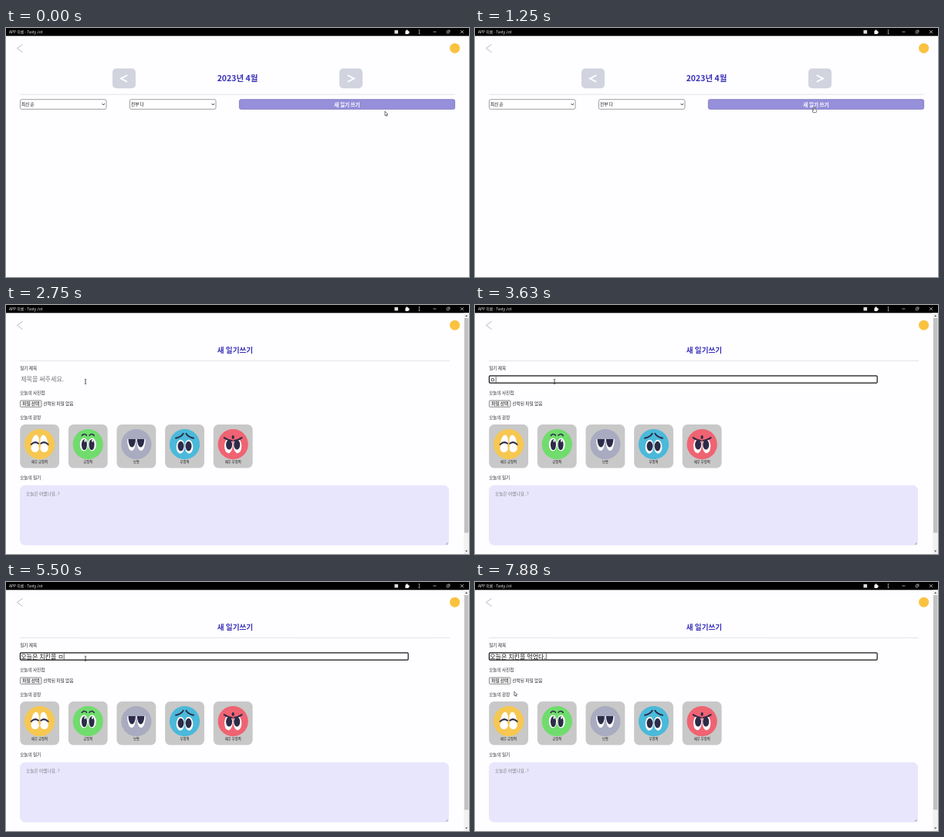
An HTML page with a canvas that plays this animation: 600 by 323 pixels, repeating every 8000 ms.

```html
<!DOCTYPE html>
<html lang="ko">
<head>
<meta charset="utf-8">
<title>Diary</title>
<style>
html, body { margin: 0; width: 100%; height: 100%; overflow: hidden; background: #fefdff; }
canvas { display: block; width: 600px; height: 323px; }
</style>
</head>
<body>
<canvas id="stage"></canvas>
<script>
const LOOP = 8000, TICK = 125;
const FONT = '"Noto Sans CJK KR", "Noto Sans CJK", "Noto Sans", sans-serif';
const INK = '#2c2b48', BLUE = '#3730b8';
const canvas = document.getElementById('stage');
const ctx = canvas.getContext('2d');
const dpr = window.devicePixelRatio || 1;
canvas.width = 600 * dpr;
canvas.height = 323 * dpr;

function rect(x, y, w, h, color) {
  ctx.fillStyle = color;
  ctx.fillRect(x, y, w, h);
}

function box(x, y, w, h, r, fill, stroke, lw = 0.8) {
  ctx.beginPath();
  ctx.roundRect(x, y, w, h, r);
  if (fill) { ctx.fillStyle = fill; ctx.fill(); }
  if (stroke) { ctx.strokeStyle = stroke; ctx.lineWidth = lw; ctx.stroke(); }
}

function text(str, x, y, size, color, align = 'left', weight = 400) {
  ctx.font = `${weight} ${size}px ${FONT}`;
  ctx.textAlign = align;
  ctx.textBaseline = 'middle';
  ctx.fillStyle = color;
  ctx.fillText(str, x, y);
  return ctx.measureText(str).width;
}

function line(points, color, lw) {
  ctx.beginPath();
  points.forEach(([x, y]) => ctx.lineTo(x, y));
  ctx.strokeStyle = color;
  ctx.lineWidth = lw;
  ctx.stroke();
}

function oval(x, y, rx, ry, color, tilt = 0, from = 0, to = Math.PI * 2) {
  ctx.beginPath();
  ctx.ellipse(x, y, rx, ry, tilt, from, to);
  ctx.fillStyle = color;
  ctx.fill();
}

function curve(x0, y0, cx, cy, x1, y1, lw) {
  ctx.beginPath();
  ctx.moveTo(x0, y0);
  ctx.quadraticCurveTo(cx, cy, x1, y1);
  ctx.strokeStyle = INK;
  ctx.lineWidth = lw;
  ctx.lineCap = 'round';
  ctx.stroke();
  ctx.lineCap = 'butt';
}

function triangle(x, y, w, h, color) {
  ctx.beginPath();
  ctx.moveTo(x - w, y - h);
  ctx.lineTo(x + w, y - h);
  ctx.lineTo(x, y + h);
  ctx.fillStyle = color;
  ctx.fill();
}

function drawFrame() {
  rect(0, 0, 600, 323, '#fefdff');
  rect(0, 0, 600, 10.3, '#000');
  text('APP 이름 - Tasty Jot', 4, 5.5, 4.9, '#eee');
  rect(503.5, 2.8, 4.6, 4.6, '#ddd');
  box(517.5, 3.5, 4.3, 4.4, 0.6, '#fff');
  oval(519.6, 3.3, 1, 1, '#fff');
  oval(522, 5.6, 1, 1, '#fff');
  [2.9, 5.1, 7.3].forEach(y => oval(535.5, y, 0.7, 0.7, '#fff'));
  line([[553.5, 5], [557.5, 5]], '#ddd', 0.7);
  box(571.2, 3.9, 2.8, 2.8, 0, null, '#ddd', 0.6);
  line([[572.3, 3], [575, 3], [575, 5.7]], '#ddd', 0.6);
  line([[589, 3], [593, 7]], '#ddd', 0.7);
  line([[593, 3], [589, 7]], '#ddd', 0.7);
  line([[21.7, 21.2], [14.4, 26.4], [21.7, 31.6]], '#aaa9b2', 0.8);
  oval(581.6, 26.2, 6.5, 6.5, '#fac23f');
}

function navButton(x, dir) {
  box(x, 52.5, 30, 25.7, 5, '#d1d3df');
  const c = x + 15, d = 4.2 * dir;
  line([[c - d, 61.3], [c + d, 65.6], [c - d, 69.9]], '#fff', 1.8);
}

function select(x, label) {
  box(x + 0.4, 92.7, 111.6, 12.6, 2, '#fff', '#85858a', 0.8);
  text(label, x + 2, 99, 5.6, '#111');
  line([[x + 106.7, 98.2], [x + 108.3, 99.8], [x + 109.9, 98.2]], '#111', 1);
}

function drawList() {
  navButton(138, -1);
  navButton(432, 1);
  text('2023년 4월', 300, 65.4, 10.5, BLUE, 'center', 700);
  line([[18, 86.2], [582, 86.2]], '#dddce2', 0.8);
  select(18, '최신 순');
  select(160, '전부 다');
  box(302.4, 92.7, 279.2, 12.6, 2, '#968fda', '#7771bd', 0.8);
  text('새 일기 쓰기', 442, 99.2, 6.6, '#fff', 'center', 700);
}

// Each face is drawn around the centre of its disc.
const faces = [
  ['매우 긍정적', '#f6c751', () => {
    for (const s of [-1, 1]) {
      oval(s * 5.6, -2, 4.8, 10.3, '#fff', s * -0.12);
      oval(s * 6, 5, 5.2, 5.2, '#fff');
      curve(s * 1.6, -1, s * 6, -4.6, s * 11, 0.2, 2);
    }
  }],
  ['긍정적', '#70dc6d', () => {
    for (const s of [-1, 1]) {
      oval(s * 5.3, 0.3, 5.2, 8.4, '#fff');
      oval(s * 4.8, 0.6, 3.5, 7, INK);
      oval(s * 4.8 + 1, -4.4, 1, 1.5, '#fff');
      curve(s * 1.8, -11.6, s * 5, -14.8, s * 8, -11.2, 1.5);
    }
  }],
  ['보통', '#a9abc0', () => {
    for (const s of [-1, 1]) {
      oval(s * 6.1, -6.6, 5.7, 15, '#fff', 0, 0, Math.PI);
      oval(s * 5.7, -6.6, 4.7, 10.3, INK, 0, 0, Math.PI);
    }
  }],
  ['부정적', '#4bb9da', () => {
    for (const s of [-1, 1]) {
      oval(s * 5.5, 3, 5.3, 9, '#fff', s * -0.05);
      oval(s * 5, 2.4, 4, 6.3, INK);
      curve(s * 1.8, -14, s * 4.5, -9.4, s * 11.5, -8, 1.9);
    }
  }],
  ['매우 부정적', '#ef6372', () => {
    for (const s of [-1, 1]) {
      oval(s * 5.7, 1.8, 5.4, 9.8, '#fff', s * -0.05);
      oval(s * 5.1, 0.6, 4, 6.3, INK);
      ctx.beginPath();
      ctx.moveTo(0, -3.5);
      ctx.lineTo(s * 12, -7.5);
      ctx.lineTo(s * 12, -12);
      ctx.lineTo(0, -9);
      ctx.fillStyle = '#ef6372';
      ctx.fill();
      curve(s * 1.4, -4.8, s * 6, -5, s * 11.5, -8.6, 1.9);
    }
    oval(0, -9.2, 1.6, 2.4, INK);
  }]
];

function drawCard([label, color, face], i) {
  const x = 18.2 + i * 62.65, cx = x + 25.4;
  box(x, 155, 50.8, 56.4, 6.5, '#c8c8c8');
  ctx.save();
  ctx.translate(cx, 180.7);
  oval(0, 0, 19.6, 19.6, color);
  face();
  ctx.restore();
  text(label, cx, 203, 4.35, '#1c1c1c', 'center', 500);
}

function drawScrollbar() {
  rect(593.3, 10.3, 6.7, 313, '#f1f1f1');
  rect(594, 17, 5.4, 278.5, '#c1c1c1');
  triangle(596.7, 14, 1.6, -1, '#505050');
  triangle(596.7, 319.6, 1.6, 1, '#505050');
}

// Keystroke states of the typed title, word by word.
const words = [
  ['', 'ㅇ 오 온 오느 오늘 오늘ㅇ 오늘으 오늘은'],
  ['오늘은 ', '- ㅊ 치 칰 치키 치킨 치킨ㅇ 치킨으 치킨을'],
  ['오늘은 치킨을 ', '- ㅁ 머 먹 먹ㅇ 먹어 먹었 먹었ㄷ 먹었다 먹었다.']
];
const typed = words.flatMap(([done, steps]) =>
  steps.split(' ').map(s => done + (s === '-' ? '' : s)));

function titleText(t) {
  if (t < 3625) return '';
  const k = t < 5500 ? (t - 3625) / 104 : 18 + (t - 5500) / 156;
  return typed[Math.min(typed.length - 1, Math.floor(k))];
}

function caretOn(t) {
  return t >= 2875 && !(t >= 3375 && t < 3625) && !(t >= 7250 && t < 7500);
}

function drawTitleInput(t) {
  const value = titleText(t);
  if (t >= 2875) box(18.4, 91.9, 502.8, 9.2, 1, '#fff', '#151515', 1.2);
  const w = value
    ? text(value, 19.2, 96.7, 8.05, '#151515')
    : (text('제목을 써주세요.', 19.2, 96.2, 8.05, '#77767b'), 0);
  if (caretOn(t)) rect(19.4 + w, 92.6, 0.6, 8, '#111');
}

function drawWrite(t) {
  text('새 일기쓰기', 297, 58.8, 9.6, BLUE, 'center', 700);
  line([[18, 72.4], [575, 72.4]], '#dddce2', 0.8);
  [['일기 제목', 82], ['오늘의 사진첩', 114], ['오늘의 감정', 145.7], ['오늘의 일기', 224.3]]
    .forEach(([s, y]) => text(s, 18.2, y, 5.6, '#26252b', 'left', 500));
  drawTitleInput(t);
  box(18.4, 123.9, 27.6, 8.4, 1, '#efefef', '#767676', 0.8);
  text('파일 선택', 32.2, 128.2, 5.6, '#111', 'center');
  text('선택된 파일 없음', 48.2, 128.2, 5.7, '#26252b');
  faces.forEach(drawCard);
  box(18, 233.8, 556, 78, 7, '#e8e6fc');
  text('오늘은 어땠나요..?', 26, 245.2, 5.7, '#7b7a84');
  line([[569.8, 311], [573, 307.8]], '#66656e', 0.6);
  line([[571.6, 311], [573, 309.6]], '#66656e', 0.6);
  drawScrollbar();
}

const pointers = {
  arrow() {
    ctx.beginPath();
    [[0, 0], [0, 5.6], [1.3, 4.5], [2.2, 6.4], [3.1, 6], [2.3, 4.1], [4, 4.1]]
      .forEach(([x, y]) => ctx.lineTo(x, y));
    ctx.closePath();
    ctx.fillStyle = '#fff';
    ctx.fill();
    ctx.strokeStyle = '#222';
    ctx.lineWidth = 0.6;
    ctx.stroke();
  },
  hand() {
    box(-1.2, 3, 5.4, 4.3, 1.4, '#fff', '#222', 0.6);
    box(0, 0.2, 1.5, 5, 0.7, '#fff', '#222', 0.6);
    rect(0.3, 3.4, 3.4, 2.6, '#fff');
  },
  beam() {
    line([[0, -2.8], [0, 2.8]], '#222', 0.8);
    line([[-1.3, -3], [1.3, -3]], '#222', 0.6);
    line([[-1.3, 3], [1.3, 3]], '#222', 0.6);
  }
};

// start, end, from, to
const moves = [
  [0, 375, [491, 108], [480, 106]],
  [625, 1250, [480, 106], [438.5, 102.3]],
  [2000, 2750, [437.5, 102], [103, 99.3]],
  [7625, 7875, [103, 99.3], [50.8, 142]]
];

function pointerAt(t) {
  const [start, end, a, b] = moves.filter(m => t >= m[0]).pop();
  const p = Math.min(1, (t - start) / (end - start));
  const e = p * p * (3 - 2 * p);
  return a.map((v, i) => v + (b[i] - v) * e);
}

function drawPointer(t) {
  const [x, y] = pointerAt(t);
  const overButton = t < 1625 && y < 105.5;
  const overInput = t >= 2625 && y < 102;
  ctx.save();
  ctx.translate(x, y);
  pointers[overButton ? 'hand' : overInput ? 'beam' : 'arrow']();
  ctx.restore();
}

function draw(now) {
  const t = Math.floor((now % LOOP) / TICK) * TICK;
  ctx.setTransform(dpr, 0, 0, dpr, 0, 0);
  drawFrame();
  if (t < 1625) drawList(); else drawWrite(t);
  drawPointer(t);
}

let origin;
function tick(now) {
  origin ??= now;
  draw(Math.max(0, now - origin));
  requestAnimationFrame(tick);
}
requestAnimationFrame(tick);
</script>
</body>
</html>
```
